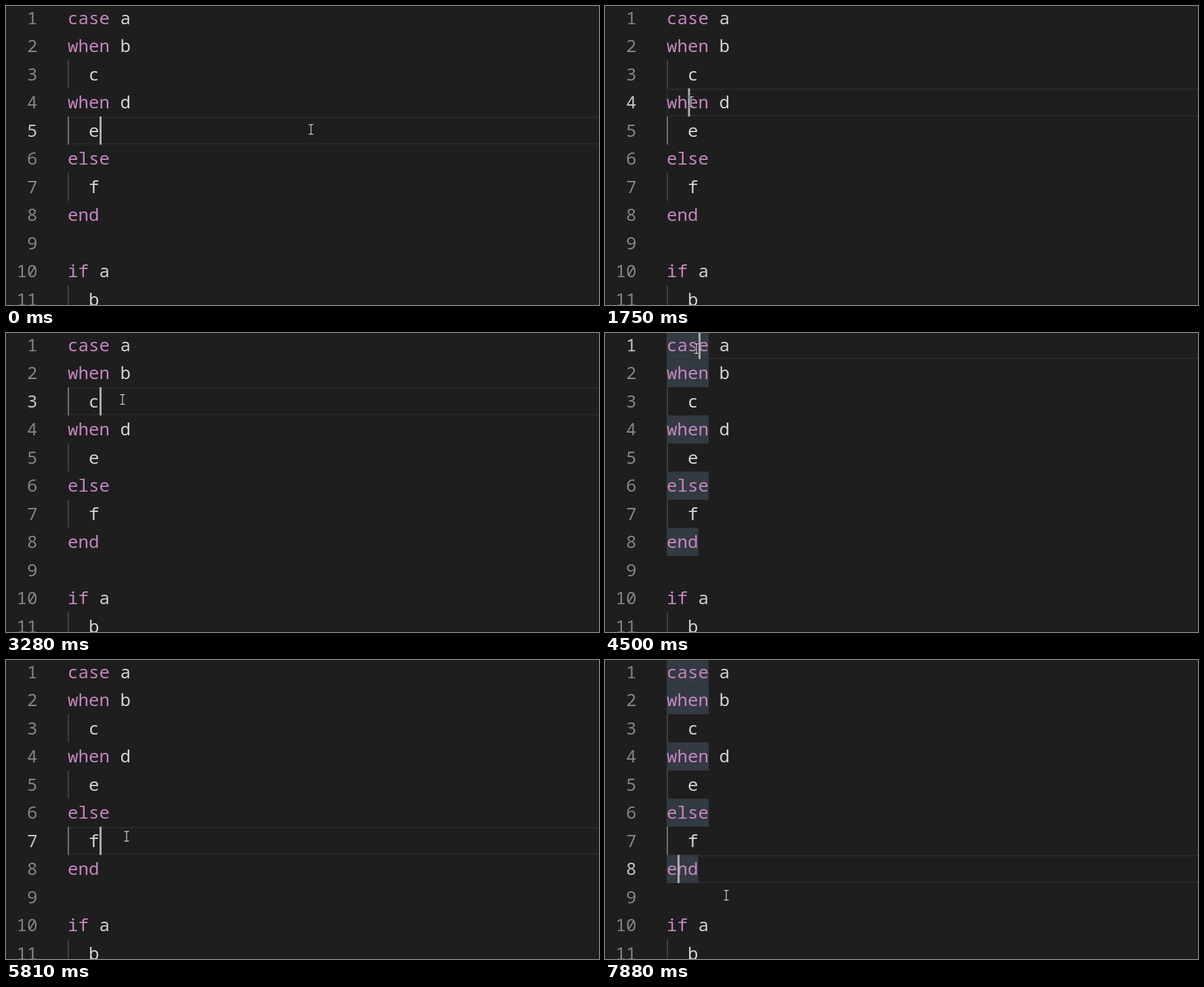
An HTML page for the animation above (8000 ms loop, 875 by 441 pixels).

```html
<!DOCTYPE html>
<html lang="en">
<head>
<meta charset="utf-8">
<title>Keyword highlighting in an editor</title>
<style>
  html, body { margin: 0; width: 100%; height: 100%; overflow: hidden; background: #1e1e1e; }
  svg { display: block; width: 875px; height: 441px; }
  text { font: 25.83px "Noto Sans Mono", "DejaVu Sans Mono", monospace; fill: #d4d4d4; white-space: pre; }
  .number { fill: #858585; text-anchor: end; }
  .number.active { fill: #c6c6c6; }
  .keyword { fill: #c586c0; }
  .guide { fill: #404040; }
  .guide.active { fill: #707070; }
  .match { fill: #343a41; }
  #current { fill: none; stroke: #282828; stroke-width: 2.5; }
  #caret { fill: #aeafad; }
  #pointer path { fill: none; stroke: #e4e4e4; stroke-width: 1.2; }
  #pointer .edge { stroke: #111; stroke-width: 2.8; }
</style>
</head>
<body>
<svg id="stage" viewBox="0 0 875 441">
  <rect id="current" x="92" width="800" height="39"/>
  <g id="matches"></g>
  <g id="guides"></g>
  <g id="code"></g>
  <rect id="caret" width="3" height="41.5"/>
  <g id="pointer">
    <path class="edge" d="M-3.5-7.2H-1Q0-7.2 0-6Q0-7.2 1-7.2H3.5M0-6V6M-3.5 7.2H-1Q0 7.2 0 6Q0 7.2 1 7.2H3.5"/>
    <path d="M-3.5-7.2H-1Q0-7.2 0-6Q0-7.2 1-7.2H3.5M0-6V6M-3.5 7.2H-1Q0 7.2 0 6Q0 7.2 1 7.2H3.5"/>
  </g>
</svg>
<script>
  const LOOP = 8000, LEFT = 91, CHAR = 15.5, ROW = 41.5, BLINK = 500;
  const LINES = ['case a', 'when b', '  c', 'when d', '  e', 'else', '  f', 'end', '', 'if a', '  b'];
  const MATCHED = [1, 2, 4, 6, 8];

  // steps: pictures in the span; travel: how many of them move the pointer
  const MOVES = [
    { from: 150, to: 1090, steps: 7, travel: 7, x: 166, y: 146 },
    { from: 1210, to: 1750, steps: 5, travel: 4, x: 127, y: 141 },
    { from: 2330, to: 2970, steps: 5, travel: 5, x: 172, y: 98 },
    { from: 3710, to: 4500, steps: 6, travel: 4, x: 135, y: 23 },
    { from: 4810, to: 5530, steps: 6, travel: 6, x: 178, y: 260 },
    { from: 6090, to: 6870, steps: 7, travel: 6, x: 117, y: 310 },
    { from: 7430, to: 7880, steps: 4, travel: 4, x: 179, y: 347 }
  ];
  const CLICKS = [
    { time: -190, row: 5, col: 3, guide: 5 },
    { time: 1750, row: 4, col: 2, guide: 5, match: 2060 },
    { time: 3280, row: 3, col: 3, guide: 3 },
    { time: 4184, row: 1, col: 3, guide: 0, match: 4500 },
    { time: 5810, row: 7, col: 3, guide: 7 },
    { time: 6870, row: 8, col: 1, guide: 7, match: 7150 }
  ];

  const $ = id => document.getElementById(id);
  const rowTop = row => (row - 1) * ROW - 3;

  function add(parent, tag, attrs, content = '') {
    const node = document.createElementNS('http://www.w3.org/2000/svg', tag);
    for (const key in attrs) node.setAttribute(key, attrs[key]);
    node.textContent = content;
    return $(parent).appendChild(node);
  }

  const numbers = [], guides = [];
  LINES.forEach((line, i) => {
    const row = i + 1, top = rowTop(row), y = top + 29.7;
    numbers[row] = add('code', 'text', { class: 'number', x: 46.5, y }, row);
    if (line.startsWith(' ')) {
      guides[row] = add('guides', 'rect', { class: 'guide', x: LEFT, y: top, width: 2, height: ROW });
    }
    line.replace(/\w+/g, (word, col) => {
      const kind = word.length > 1 ? 'keyword' : 'name';
      add('code', 'text', { class: kind, x: LEFT + col * CHAR, y }, word);
    });
    if (MATCHED.includes(row)) {
      add('matches', 'rect', { class: 'match', x: LEFT, y: top, width: line.match(/^\w+/)[0].length * CHAR, height: ROW });
    }
  });

  const stepTime = (move, k) => Math.round(move.from + (move.to - move.from) * k / (move.steps - 1));
  const ticks = [0, ...CLICKS.flatMap(c => [c.time, c.match || 0])];
  for (const move of MOVES) {
    for (let k = 0; k < move.steps; k++) ticks.push(stepTime(move, k));
  }

  function pointerAt(time) {
    let at = { x: 450, y: 182 };
    for (const move of MOVES) {
      let done = 0;
      while (done < move.travel && stepTime(move, done) <= time) done++;
      const p = done / move.travel, ease = p * p * (3 - 2 * p);
      at = { x: at.x + (move.x - at.x) * ease, y: at.y + (move.y - at.y) * ease };
    }
    return at;
  }

  function render(now) {
    const clock = now % LOOP;
    const time = Math.max(...ticks.filter(t => t <= clock));
    const click = CLICKS.filter(c => c.time <= time).pop();
    const top = rowTop(click.row), pointer = pointerAt(time);

    $('current').setAttribute('y', top + 1.25);
    $('caret').setAttribute('x', LEFT + click.col * CHAR + 0.5);
    $('caret').setAttribute('y', top);
    $('caret').style.opacity = Math.floor((time - click.time) / BLINK) % 2 ? 0 : 1;
    $('matches').style.opacity = click.match && time >= click.match ? 1 : 0;
    $('pointer').setAttribute('transform', `translate(${pointer.x} ${pointer.y})`);
    numbers.forEach((node, row) => node.classList.toggle('active', row === click.row));
    guides.forEach((node, row) => node.classList.toggle('active', row === click.guide));
  }

  const start = performance.now();
  function frame() {
    render(performance.now() - start);
    requestAnimationFrame(frame);
  }
  frame();
</script>
</body>
</html>
```
